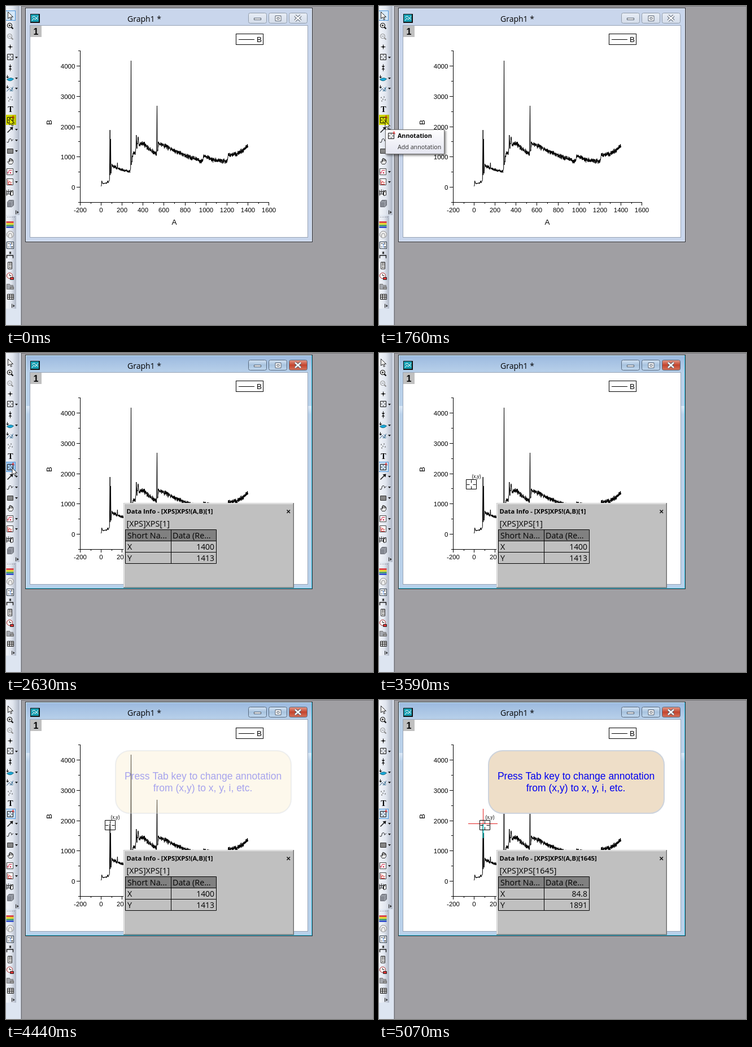
Animation, 650 px wide and 566 px high, one loop 8 s. Source, as an HTML page with a canvas:

```html
<!DOCTYPE html>
<html>
<head>
<meta charset="utf-8">
<style>
html, body { margin: 0; height: 100%; overflow: hidden; background: #a09fa3; }
canvas { display: block; }
</style>
</head>
<body>
<canvas id="stage" width="650" height="566"></canvas>
<script>
const c = document.getElementById('stage').getContext('2d');
const UI = '"Open Sans", "Noto Sans", sans-serif';
const PLOT = '"Liberation Sans", Arial, sans-serif';
const LOOP = 8000;

const clamp = v => Math.max(0, Math.min(1, v));
const ramp = (t, from, to) => clamp((t - from) / (to - from));
const mix = (a, b, k) => a + (b - a) * k;
const px = v => Math.round(v) + 0.5;

function box(x, y, w, h, fill, stroke) {
  if (fill) { c.fillStyle = fill; c.fillRect(x, y, w, h); }
  if (stroke) { c.strokeStyle = stroke; c.lineWidth = 1; c.strokeRect(x + 0.5, y + 0.5, w - 1, h - 1); }
}

// Frame whose top and left edges differ from its bottom and right ones
function bevel(x, y, w, h, light, dark) {
  box(x, y, w, h, 0, dark);
  box(x, y, w - 1, 1, light);
  box(x, y, 1, h - 1, light);
}

function path(d, stroke, fill, width = 1) {
  const p = typeof d === 'string' ? new Path2D(d) : d;
  if (fill) { c.fillStyle = fill; c.fill(p); }
  if (stroke) { c.strokeStyle = stroke; c.lineWidth = width; c.stroke(p); }
}

function at(x, y, draw) {
  c.save();
  c.translate(x, y);
  draw();
  c.restore();
}

function text(s, x, y, size, font = UI, align = 'left', color = '#000', weight = '') {
  c.font = `${weight} ${size}px ${font}`;
  c.textAlign = align;
  c.fillStyle = color;
  c.fillText(s, x, y);
}

function gradient(x0, y0, x1, y1, ...colors) {
  const g = c.createLinearGradient(x0, y0, x1, y1);
  colors.forEach((col, i) => g.addColorStop(i / (colors.length - 1), col));
  return g;
}

// Spectrum: anchor points in stage pixels, noise added between distant ones
const anchors = [
  [168, 320], [169, 319], [169.6, 310], [171, 315], [179, 314], [180, 310], [181, 314], [183.3, 308],
  [184.2, 220], [184.6, 300], [185.3, 236], [186, 297], [187.5, 281], [190, 285], [196.8, 287], [197.4, 278],
  [198, 288], [206, 291], [219.5, 293.5], [220.7, 288], [221.5, 97], [222, 282], [223, 275], [225, 261],
  [229, 261], [230.2, 250], [230.8, 229], [232, 253], [234, 232], [235.5, 246], [243, 244], [252, 252],
  [262, 260], [266.5, 262], [267.5, 177], [268.2, 258], [270, 244], [276, 246], [300, 257], [322, 267],
  [346, 275], [349, 272], [350, 265], [356, 269], [372, 274], [391, 276], [394, 265], [409, 263],
  [420, 255], [428.5, 248]
];

function makeCurve() {
  let seed = 7;
  const rnd = () => (seed = seed * 16807 % 2147483647) / 2147483647;
  const p = new Path2D();
  anchors.forEach(([x, y], i) => {
    if (!i) return p.moveTo(x, y);
    const [x0, y0] = anchors[i - 1];
    const amp = x < 184 ? 1 : x < 221 ? 2.6 : 4;
    if (x - x0 > 1.7)
      for (let u = x0 + 0.2; u < x; u += 0.2)
        p.lineTo(u, mix(y0, y, (u - x0) / (x - x0)) + (rnd() + rnd() + rnd() - 1.5) * amp);
    p.lineTo(x, y);
  });
  return p;
}
const curve = makeCurve();

const POINTER = 'M0 0V12L2.9 9.5L4.8 14L6.8 13.1L4.9 8.8H8.7Z';
const TARGET = 'M-5 -5H5V5H-5ZM0 -4V-2M0 2V4M-4 0H-2M2 0H4';
const DOWN_ARROW = [['M-5 -6V-2', '#111'], ['M-7 -3H-2L-5 0Z', 0, '#111']];

function annotationIcon() {
  path(TARGET, '#111');
  path('M3 -3L5 -8L7 -3M4 -5H6', '#d22');
}

// Each entry: centre y, then [path, stroke, fill, line width]
const icons = [
  [17, ['M-4 -7V5L-1 2L1 7L3 6L1 2H5Z', '#222', '#fff']],
  [35, ['M3 -1A4 4 0 1 1 -5 -1A4 4 0 1 1 3 -1M-3 -1H1M-1 -3V1', '#111', '#fff', 1.2], ['M2 2L5 5', '#111', 0, 2.4]],
  [54, ['M3 -1A4 4 0 1 1 -5 -1A4 4 0 1 1 3 -1M-3 -1H1', '#888'], ['M2 2L5 5', '#888', 0, 2]],
  [72, ['M0 -4V4M-4 0H4', '#111'], ['M-1 -1H1V1H-1Z', '#111']],
  [90, [TARGET, '#111']],
  [109, ['M0 -6V-2M0 6V2', '#111'], ['M-3 -3H3L0 0ZM-3 3H3L0 0Z', 0, '#111']],
  [128, ['M-6 2Q0 -3 6 1Q0 7 -6 2Z', '#167', '#18a8dc'], ...DOWN_ARROW],
  [146, ['M-6 5L-2 0L2 3L5 -3', '#234f78'], ['M1 -2L5 2M-1 4H5', '#268'], ...DOWN_ARROW],
  [165, ['M-4 -3h1M1 -4h1M-1 0h1M3 1h1M-3 3h1', '#222', 0, 2]],
  [219, ['M-5 5L3 -3', '#111', 0, 1.4], ['M5 -5L4 1L-1 -4Z', 0, '#111']],
  [238, ['M-6 3C-1 6 -4 -3 0 -3S0 5 5 -2', '#111']],
  [256, ['M-5 -3H5V5H-5Z', '#333', '#858585']],
  [275, ['M-2 5L-5 1L-4 0L-2 2V-3L-1 -4V0V-5H1V0V-4H3V0L4 -3L5 -2V2L3 5Z', '#222', '#fff']],
  [294, ['M-6 -6H5V5H-6Z', '#444', '#fff'], ['M-5 0L-4 3L-2 -3H3M-1 0L2 3M2 0L-1 3', '#c24']],
  [312, ['M-6 -6H5V5H-6Z', '#444', '#fff'], ['M-4 -4V4H3M-3 2L-1 -2L1 2L3 0', '#c22']],
  [331, ['M-6 -5V5M-3 -6V1M0 -5V4M-7 -2H2M-7 2H1', '#222'], ['M1 5V-1L2 -4L3 -1V-4H5V4Z', '#222', '#fff']],
  [350, ['M-5 -3L-2 -6H6V3L3 6H-5Z', '#6c6f78', '#858992'], ['M-5 -3H3V6M3 -3L6 -6', '#aaaeb6']],
  [387, ['M-7 -4H6', '#d22', 0, 2.4], ['M-7 -1H6', '#e8d400', 0, 2.4], ['M-7 2H6', '#178a3a', 0, 2], ['M-7 5H6', '#1838c8', 0, 2.4]],
  [405, ['M6 0A6 6 0 1 1 -6 0A6 6 0 1 1 6 0', '#888', '#eee'], ['M-3 4V1A3 3 0 1 1 3 1V4', '#888']],
  [424, ['M-6 -6H6V6H-6Z', '#234', '#fff'], ['M-4 -3H-1M-4 3H-2M1 -4H4M1 -2H4M2 2H4V4H2', '#333'], ['M-1 3H2M0 -3V1', '#26c']],
  [441, ['M-6 6V1H5V6', '#111', 0, 1.3], ['M0 -6V-1M-2 -5L2 -2M2 -5L-2 -2', '#111']],
  [460, ['M-4 -6H3V6H-4Z', '#222', '#fff'], ['M-2 -4H0M1 -4H2M-2 -1H0M1 -1H2M-2 3H0M1 3H2', '#222', 0, 2]],
  [479, ['M4 -1A5 5 0 1 1 -6 -1A5 5 0 1 1 4 -1', '#a22', '#fff'], ['M-1 -4V-1H2', '#222'], ['M0 2H6V6H0Z', '#222', '#d33']],
  [497, ['M-6 -4H-1L0 -2H5V5H-6Z', '#777', '#a5a8ae'], ['M0 1H6V5H0Z', '#666', '#999']],
  [515, ['M-5 -4H6V5H-5ZM-5 -1H6M-5 2H6M-1 -4V5M3 -4V5', '#111', '#fff']]
];
const dropdowns = [91, 128, 146, 219, 238, 257, 294, 312];

function selection(y, fill) {
  box(-1, y - 9, 18, 18, fill, '#4a96dc');
}

function toolbar(t) {
  box(0, 0, 26, 566, '#dde5f1');
  box(0, 0, 24, 371, gradient(0, 0, 24, 0, '#f2f5fa', '#e1e6ef', '#aeb6c5'));
  box(0, 372, 18, 165, gradient(0, 0, 18, 0, '#f2f5fa', '#e1e6ef', '#aeb6c5'));
  box(26, 0, 1, 566, '#a9acb4');
  box(27, 0, 1, 566, '#6e6f75');
  if (t < 2400) selection(17, '#d5e8fa');
  else selection(202, t < 3320 ? '#9fc6ee' : '#cfe4f8');
  if (t >= 1900 && t < 2400) selection(202, '#9fc6ee');
  for (const [y, ...parts] of icons)
    at(7.5, y + 0.5, () => parts.forEach(p => path(...p)));
  at(7.5, 202.5, annotationIcon);
  text('T', 8, 188, 14, '"Liberation Serif", serif', 'center', '#000', 'bold');
  for (const y of dropdowns) path(`M16 ${y - 1}h5l-2.5 3z`, 0, '#111');
  for (const [x, y] of [[18, 365], [11, 531]])
    at(x + 0.5, y + 0.5, () => {
      path('M-1 -3V4', '#222');
      path('M1 -2L4 0.5L1 3Z', 0, '#222');
    });
  for (let x = 2; x < 15; x += 3) box(x, 374, 1, 1, '#667');
}

function captionButton(x, active, color) {
  const fill = !active ? gradient(0, 12, 0, 31, '#e8edf5', '#d3dcea')
    : color || gradient(0, 12, 0, 31, '#d5e4f4', '#a8c3df', '#c3daf0');
  c.beginPath();
  c.roundRect(x + 0.5, 12.5, 32, 18, 3);
  c.fillStyle = fill;
  c.fill();
  c.strokeStyle = active ? '#56697f' : '#909cab';
  c.lineWidth = 1;
  c.stroke();
}

function graphWindow(active) {
  const frame = active ? '#b9d1ea' : '#c9d6ec';
  box(34, 3, 509, 416, frame, '#2c3038');
  if (active) {
    box(35, 4, 507, 31, gradient(0, 4, 0, 35, '#9bb9df', '#b9d1ea'));
    for (const x of [36, 535]) box(x, 94, 6, 15, gradient(0, 94, 0, 109, '#dce9f7', '#b9d1ea'));
    bevel(35, 4, 507, 414, '#d6f2fb', '#35c8e6');
  } else {
    box(35, 4, 507, 414, 0, '#e6edf8');
  }
  box(42, 34, 493, 377, '#fff', '#98a4b6');

  box(43, 14, 17, 16, '#111');
  box(44, 15, 14, 13, '#18a0b4');
  path('M46 26L49 22L52 24L57 18M46 20L50 18L53 21L57 24', '#fff');
  text('Graph1 *', 215, 28, 14);
  captionButton(429, active);
  captionButton(465, active);
  captionButton(501, active, gradient(0, 12, 0, 31, '#e5a091', '#c4452e', '#d5765f'));
  const ink = '#505b6b';
  box(439, 21, 13, 4, '#fff', ink);
  path('M477 17.5H487V26.5H477ZM480 20.5H484V23.5H480Z', ink, '#fff');
  path('M512 17L522 26M522 17L512 26', ink, 0, 4.4);
  path('M512 17L522 26M522 17L512 26', '#fff', 0, 2.4);

  box(43, 35, 20, 20, '#c0c0c0');
  text('1', 53, 51, 16, PLOT, 'center', '#000', 'bold');
  box(407, 49, 49, 20, '#fff', '#000');
  path('M412 59.5H440', '#000');
  text('B', 444, 64, 13.5, PLOT);
}

function plot() {
  path('M131.5 79V348.5H466', '#000');
  for (let i = 0; i <= 18; i++) {
    const x = px(131 + i * 18.56);
    path(`M${x} 348v${i % 2 ? 3 : 6}`, '#000');
    if (i % 2 === 0) text(i * 100 - 200, x, 366, 11.4, PLOT, 'center');
  }
  for (let i = 0; i <= 10; i++) {
    const y = px(348 - i * 26.9);
    path(`M131 ${y}h${i % 2 ? -6 : -3}`, '#000');
    if (i % 2) text((i - 1) * 500, 122.5, y + 4, 11.6, PLOT, 'right');
  }
  text('A', 298, 388, 13.5, PLOT, 'center');
  at(80.5, 206.5, () => {
    c.rotate(-Math.PI / 2);
    text('B', 0, 0, 13.5, PLOT, 'center');
  });
  c.lineJoin = 'bevel';
  path(curve, '#000');
  c.lineJoin = 'miter';
}

function dataInfo(row, x, y) {
  box(208, 266, 302, 151, '#c0c0c0');
  bevel(208, 266, 302, 151, '#c8c8c8', '#696969');
  bevel(209, 267, 300, 149, '#f4f4f4', '#a0a0a0');
  text(`Data Info - [XPS]XPS!(A,B)[${row}]`, 213.5, 285, 11.2, UI, 'left', '#000', 'bold');
  path('M497.5 278.5L503 284M503 278.5L497.5 284', '#111', 0, 1.5);
  text(`[XPS]XPS[${row}]`, 213.5, 308, 14.3);
  box(211, 313, 162, 21, '#808080');
  path('M211.5 313.5H372.5V373.5H211.5ZM292.5 313V373M211 333.5H373M211 353.5H373', '#000');
  text('Short Na...', 215, 329, 14.3);
  text('Data (Re...', 295, 329, 14.3);
  text('X', 215, 349, 14.3);
  text('Y', 215, 369, 14.3);
  text(x, 369, 349, 13.9, UI, 'right');
  text(y, 369, 369, 13.9, UI, 'right');
}

function tooltip(alpha) {
  if (!alpha) return;
  c.save();
  c.globalAlpha = alpha;
  c.shadowColor = 'rgba(0,0,0,.55)';
  c.shadowBlur = 4;
  c.shadowOffsetX = c.shadowOffsetY = 2;
  box(11, 219, 105, 44, gradient(0, 219, 0, 263, '#fff', '#e4e5f0'));
  c.shadowColor = 'transparent';
  box(11, 219, 105, 44, 0, '#767676');
  at(21.5, 230.5, annotationIcon);
  text('Annotation', 33, 234, 10.7, UI, 'left', '#000', 'bold');
  text('Add annotation', 33, 254, 10.7, UI, 'left', '#333');
  c.restore();
}

function balloon(alpha) {
  if (!alpha) return;
  c.globalAlpha = alpha;
  c.beginPath();
  c.roundRect(194, 90, 311, 111, 25);
  c.fillStyle = `rgb(${mix(255, 238, alpha)}, ${mix(242, 222, alpha)}, 200)`;
  c.fill();
  c.strokeStyle = '#cdd3dc';
  c.lineWidth = 2;
  c.stroke();
  text('Press Tab key to change annotation', 349, 141, 17.5, PLOT, 'center', '#0000f0');
  text('from (x,y) to x, y, i, etc.', 348.5, 162, 17.5, PLOT, 'center', '#0000f0');
  c.globalAlpha = 1;
}

// Mouse stops: time, x, y
const route = [[0, 6, 199], [130, 6, 199], [250, 11, 204], [3260, 11, 204], [3590, 163, 233],
  [4010, 184, 222], [4500, 184, 222], [4740, 187, 222], [LOOP, 187, 222]];

function mouse(t) {
  const i = route.findIndex(r => r[0] > t);
  const [t0, x0, y0] = route[i - 1], [t1, x1, y1] = route[i];
  const k = ramp(t, t0, t1);
  return [mix(x0, x1, k), mix(y0, y1, k)];
}

function cursor(t) {
  const [x, y] = mouse(t);
  if (x < 28) return at(x, y, () => path(POINTER, '#222', '#fff'));
  at(px(x), px(y), () => {
    path('M-9 -9H9V8H-9ZM-8 0H-3M3 0H8M0 -8V-3M0 3V8', '#000');
    text('(x,y)', 1, -11.5, 8.2, PLOT);
  });
}

function draw(now) {
  const t = now % LOOP;
  const picked = t >= 4740;
  box(0, 0, 650, 566, '#a09fa3');
  box(0, 0, 650, 1, '#77767b');
  toolbar(t);
  graphWindow(t >= 1900);
  plot();
  if (t >= 2400) picked ? dataInfo(1645, '84.8', '1891') : dataInfo(1, '1400', '1413');
  if (picked) {
    path('M158 219.5H210M184.5 193V220', '#e02020');
    path('M184.5 220V245', '#00d8d8', 0, 1.4);
  }
  tooltip(ramp(t, 520, 730) * (1 - ramp(t, 1760, 1930)));
  cursor(t);
  c.globalCompositeOperation = 'multiply';
  c.globalAlpha = 1 - ramp(t, 1730, 2630);
  box(0, 193, 18, 18, '#e2e600');
  c.globalAlpha = 1;
  c.globalCompositeOperation = 'source-over';
  balloon(ramp(t, 4110, 5070));
}

let start;
function frame(now) {
  start ??= now;
  draw(now - start);
  requestAnimationFrame(frame);
}
requestAnimationFrame(frame);
</script>
</body>
</html>
```
